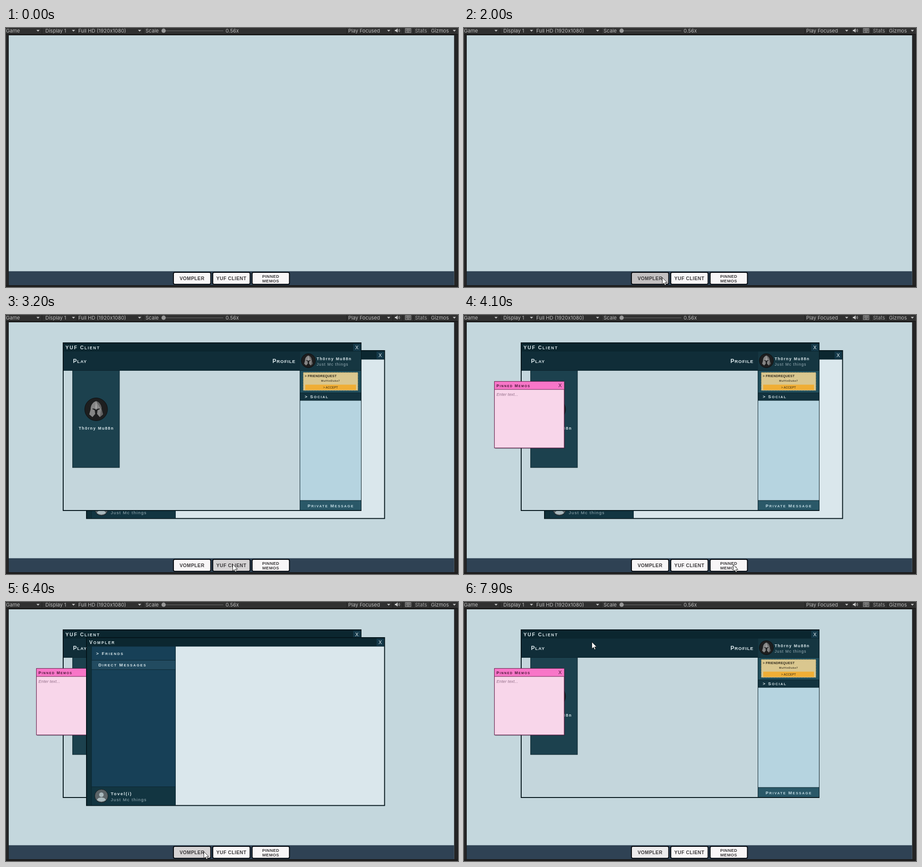
Animation of 988x567 px, one loop 8000 ms. Source, as an HTML page:

```html
<!DOCTYPE html>
<html lang="en">
<head>
<meta charset="utf-8">
<title>Desktop</title>
<style>
  html, body { margin: 0; width: 100%; height: 100%; overflow: hidden; background: #1d1d1d; }
  svg { display: block; width: 100%; height: 100%; }
  text { font-family: "Liberation Sans", Arial, sans-serif; white-space: pre; }
  .editor text { font-family: Inter, sans-serif; }
</style>
</head>
<body>
<svg id="stage" viewBox="0 0 988 567"></svg>
<script>
const LOOP = 8000, STEP = 100;
const IDLE = '#f8f6f7', HOVER = '#ecebec', HALF = '#d5d3d4', PRESSED = '#c3c0c1';

const rect = (x, y, w, h, fill, extra = '') =>
  `<rect x="${x}" y="${y}" width="${w}" height="${h}" fill="${fill}" ${extra}/>`;
const path = (d, fill, extra = '') => `<path d="${d}" fill="${fill}" ${extra}/>`;
const circle = (x, y, r, fill, extra = '') =>
  `<circle cx="${x}" cy="${y}" r="${r}" fill="${fill}" ${extra}/>`;
const label = (x, y, str, size, fill, { gap = 0, bold = false, mid = false, extra = '' } = {}) =>
  `<text x="${x}" y="${y}" font-size="${size}" fill="${fill}" letter-spacing="${gap}"
    ${bold ? 'font-weight="700"' : ''} ${mid ? 'text-anchor="middle"' : ''} ${extra}>${str}</text>`;
// Small capitals: lower-case letters become capitals at 80 % size.
const caps = (x, y, str, size, fill, options) => label(x, y,
  str.replace(/[a-z]+/g, s => `<tspan font-size="${size * 0.8}">${s.toUpperCase()}</tspan>`),
  size, fill, { bold: true, ...options });

function editorBar() {
  const grey = '#bdbdbd';
  const words = [[0, 'Game'], [86, 'Display 1'], [158, 'Full HD (1920x1080)'], [305, 'Scale'],
    [480, '0.56x'], [748, 'Play Focused'], [894, 'Stats'], [929, 'Gizmos']];
  return `<g class="editor">` + rect(0, 0, 988, 14, '#303030') + rect(0, 13, 988, 2, '#1a1a1a')
    + [78, 155, 299, 744, 845, 867, 890, 926].map(x => rect(x, 0, 1, 13, '#202020')).join('')
    + words.map(([x, s]) => label(x, 10, s, 11, s === 'Stats' ? '#a2a2a2' : grey)).join('')
    + [70, 147.5, 292, 836.5, 980].map(x => path(`M${x - 3.5} 4h7l-3.5 4z`, grey)).join('')
    + rect(349, 5.5, 126, 1.4, '#5e5e5e') + circle(344.5, 6, 4.7, '#999')
    + path('M850 4h2l4-3v9l-4-3h-2z', '#c8c8c8')
    + path('M857.5 3.5q1.5 2 0 4M859.5 2q2.5 3.500 0 7', 'none', 'stroke="#c8c8c8"')
    + rect(873, 1.500, 12, 8.5, 'none', 'stroke="#b5b5b5"')
    + path('M874 4h10M874 6.500h10M876.500 2v5M879 2v5M881.500 2v5M876 8.500h6', 'none', 'stroke="#a8a8a8" stroke-width=".9"')
    + `</g>`;
}

function taskButton(x, lines) {
  const small = lines.length > 1;
  return rect(x, 535, 81.500, 26, IDLE, 'class="task" rx="3" stroke="#05090e" stroke-width="2"')
    + lines.map((s, i) => label(x + 40.7, small ? 546.500 + i * 10 : 552, s, small ? 9.2 : 10.4,
      '#3a383a', { gap: 0.45, bold: true, mid: true })).join('');
}

const closeBox = (x, y) => rect(x, y, 16, 16, '#143848')
  + label(x + 8, y + 12, 'X', 11, '#dfecf0', { mid: true });

function chatWindow() {
  const line = '#0b2630', ink = '#dce9ed';
  return rect(176, 78, 651.500, 367.500, '#dae7ec', 'stroke="#04151b" stroke-width="2"')
    + rect(177, 79, 650, 18, '#0c2730') + closeBox(810, 80)
    + rect(177, 97, 10, 348, '#102f38')
    + rect(187, 97, 184, 348, '#174057') + rect(187, 127, 184, 21, '#224b60')
    + rect(187, 404, 184, 41, '#123541')
    + [127, 147.500, 404].map(y => rect(187, y, 184, 1, line)).join('')
    + rect(186.500, 97, 1, 348, line) + rect(370, 97, 1, 348, line) + rect(177, 96.500, 650, 1, line)
    + caps(182, 92, 'Vompler', 10.5, ink, { gap: 2 })
    + caps(197, 115.500, '> Friends', 9.5, ink, { gap: 2 })
    + caps(202, 141, 'Direct Messages', 9.5, ink, { gap: 1.9 })
    + circle(208.500, 424.500, 14.5, '#5c6468', 'stroke="#161d20"')
    + circle(208.500, 422, 5, '#a9b9be')
    + path('M199 434c0-8 19-8 19 0q-9.500 6-19 0z', '#a9b9be')
    + label(229, 423, 'Tovel(i)', 9.5, ink, { gap: 1.7, bold: true })
    + label(229, 436, 'Just Mc things', 9.5, '#9db2ba', { gap: 1.3 });
}

const helmet = (x, y, r) => circle(x, y, r, '#1d1e1f', 'stroke="#0b0f11"')
  + `<g transform="translate(${x} ${y}) scale(${r / 25})">`
  + path('M0-18C-9-15-12-7-12 0L-15 11L-8 17L-2 10L-3 2L-9-1Q-4-3 0 1Q4-3 9-1L3 2L2 10L8 17L15 11L12 0C12-7 9-15 0-18Z', '#858585')
  + path('M0-18C9-15 12-7 12 0L15 11L8 17L11 0Z', '#626262')
  + path('M0-18L2-4L0 0L-2-4Z', '#a5a5a5') + `</g>`;

function clientWindow() {
  const line = '#0a222b', ink = '#dce9ed', name = 'Th0rny Mu88n';
  return rect(125, 61, 651, 367, '#c4d6dc', 'stroke="#04151b" stroke-width="2"')
    + rect(126, 62, 650, 18, '#0b262f') + closeBox(759, 63)
    + rect(126, 80, 517, 41, '#102d38') + rect(643, 80, 133, 41, '#153641')
    + rect(126, 121, 650, 1, line)
    + caps(130, 75, 'YUF Client', 10.7, ink, { gap: 1.9 })
    + caps(146.500, 105, 'Play', 12.3, ink, { gap: 0.9 })
    + caps(582.500, 105, 'Profile', 12.3, ink, { gap: 0.9 })
    + rect(145.500, 121.500, 102.500, 212.500, '#1c414e', `stroke="${line}"`)
    + helmet(197, 206.500, 25)
    + label(197.500, 250.500, name, 8.7, ink, { gap: 1.5, bold: true, mid: true })
    + helmet(661, 100, 15.5)
    + label(679, 98.500, name, 8.7, ink, { gap: 1.5, bold: true })
    + label(679, 111, 'Just Mc things', 8.5, '#9db2ba', { gap: 1.1 })
    + rect(643, 122, 133, 48, '#204e5c')
    + rect(650, 126, 119, 39, '#dac78f', 'stroke="#bfa973" stroke-dasharray="5 1"')
    + rect(654, 152.500, 111, 11.500, '#f0ae35')
    + label(653, 136, '> FRIENDREQUEST', 7, '#30291c', { gap: 0.25, bold: true })
    + label(709.500, 145.500, 'MuffinDuke7', 5.8, '#4a412d', { gap: 0.6, bold: true, mid: true })
    + label(709.500, 161, '> ACCEPT', 6.5, '#3b2c10', { gap: 0.1, mid: true })
    + rect(643, 170, 133, 17, '#13333f') + rect(643, 187, 133, 219, '#b6d4e0')
    + rect(643, 406, 133, 21, '#2a5868')
    + [170, 186.500, 405.500].map(y => rect(643, y, 133, 1, line)).join('')
    + rect(642, 122, 1, 305, line)
    + caps(653, 182, '> Social', 9.5, ink, { gap: 1.8 })
    + caps(710, 420.500, 'Private Message', 9.4, '#c4dde6', { gap: 1.8, mid: true });
}

function memoWindow() {
  const edge = '#6b2350';
  return rect(68, 147, 153, 146, '#1d2a33', 'opacity=".35"')
    + rect(66.500, 145.500, 152.500, 145.500, '#f8d6ea', `stroke="${edge}" stroke-width="1.2"`)
    + rect(67, 146, 151.500, 17, '#f876c8') + rect(67, 162.500, 152, 1, edge)
    + caps(71, 157.500, 'Pinned Memos', 8.5, '#4a1738', { gap: 1.5 })
    + label(210, 158, 'X', 11, '#4a1738', { mid: true })
    + label(71, 176.500, 'Enter text...', 9, '#93708a', { gap: 0.1, extra: 'font-style="italic"' });
}

const stage = document.getElementById('stage');
stage.innerHTML = `<defs><g id="chat">${chatWindow()}</g></defs>`
  + rect(0, 0, 988, 567, '#1d1d1d') + rect(0, 15, 5, 548, '#252526') + rect(981, 15, 5, 548, '#252526')
  + editorBar()
  + rect(6, 16, 973.500, 547, '#c4d7dd') + rect(6, 532.500, 973.500, 30.500, '#2f4254')
  + taskButton(366, ['VOMPLER']) + taskButton(452, ['YUF CLIENT']) + taskButton(538, ['PINNED', 'MEMOS'])
  + `<use id="chatBack" href="#chat"/><g id="client">${clientWindow()}</g>`
  + `<g id="memo">${memoWindow()}</g><use id="chatFront" href="#chat"/>`
  + `<g id="cursor">${path('M.5.5V15.500L4 12.200L6.300 17.300L8.700 16.200L6.400 11.300H11Z', '#fff', 'stroke="#111" stroke-width=".9"')}</g>`;

// Visible span of each layer, in ms.
const spans = {
  chatBack: [2100, 5700], client: [3200, LOOP], memo: [4000, LOOP],
  chatFront: [5700, 6600], cursor: [900, LOOP]
};

// Button colours: [time, button, colour].
const clicks = [
  [0, 0, IDLE], [0, 1, IDLE], [0, 2, IDLE],
  [2000, 0, PRESSED], [2100, 0, HOVER], [2200, 0, IDLE],
  [3100, 1, PRESSED], [3200, 1, HALF], [3300, 1, IDLE],
  [3900, 2, PRESSED], [4000, 2, HALF], [4100, 2, IDLE],
  [5500, 0, HALF], [5600, 0, PRESSED], [5700, 0, HOVER],
  [6400, 0, HALF], [6500, 0, PRESSED], [6600, 0, HOVER]
];

// Pointer path: [time, x, y].
const route = [
  [900, 779, 552], [1100, 650, 528], [1300, 530, 515], [1500, 462, 532], [1700, 434, 546],
  [1800, 433, 546], [2500, 433, 546], [2700, 490, 538], [2800, 521, 541], [2900, 495, 545],
  [3300, 495, 545], [3600, 588, 546], [4500, 588, 546], [4800, 500, 528], [5100, 400, 540],
  [5400, 432, 546], [6900, 432, 546], [7100, 521, 547], [7400, 430, 330], [7800, 279, 100], [7900, 279, 87]
];

function pointerAt(t) {
  const next = route.findIndex(p => p[0] > t);
  if (next < 1) return (next ? route[route.length - 1] : route[0]).slice(1);
  const a = route[next - 1], b = route[next], k = (t - a[0]) / (b[0] - a[0]);
  return [a[1] + (b[1] - a[1]) * k, a[2] + (b[2] - a[2]) * k].map(Math.round);
}

const tasks = stage.querySelectorAll('.task');
const layers = Object.entries(spans).map(([id, span]) => [document.getElementById(id), span]);
const cursor = document.getElementById('cursor');
const start = performance.now();

function render() {
  const t = Math.floor((performance.now() - start) % LOOP / STEP) * STEP;
  for (const [el, [from, to]] of layers) el.style.display = t >= from && t < to ? '' : 'none';
  for (const [time, i, colour] of clicks) if (time <= t) tasks[i].setAttribute('fill', colour);
  cursor.setAttribute('transform', `translate(${pointerAt(t)})`);
  requestAnimationFrame(render);
}
render();
</script>
</body>
</html>
```
